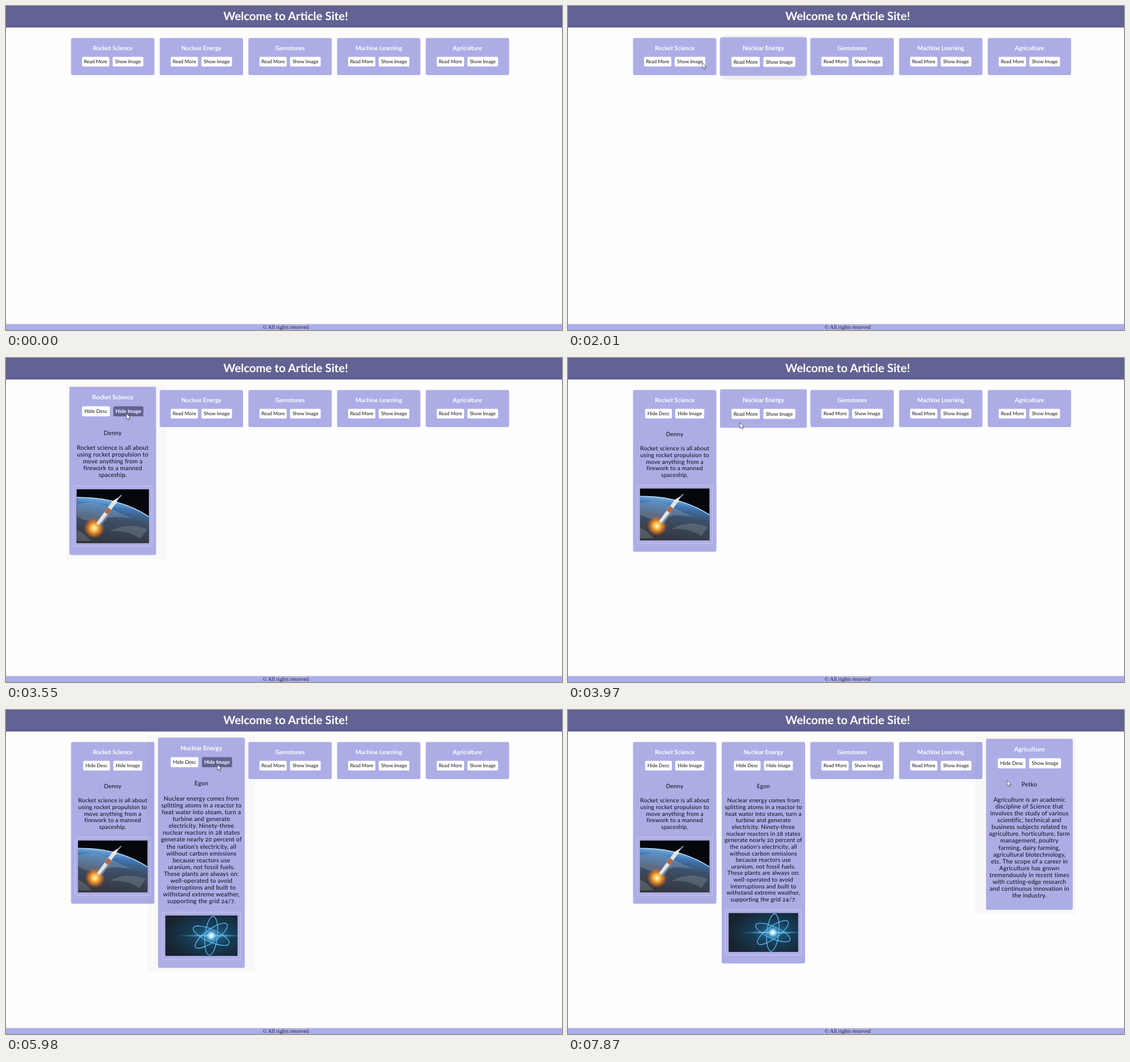
Recreate the animation shown at these times as an HTML page. Size 980x572 px, loop 8000 ms.

```html
<!DOCTYPE html>
<html lang="en">
<head>
<meta charset="utf-8">
<title>Article Site</title>
<style>
  html, body { margin: 0; width: 100%; height: 100%; overflow: hidden; background: #fefefe; }
  svg.stage { display: block; width: 980px; height: 572px; }
  text { text-anchor: middle; font-family: Lato, sans-serif; text-rendering: geometricPrecision; }
  .site { font-size: 20.4px; font-weight: 700; fill: #fff; }
  .foot { font: 9.7px "Liberation Serif", serif; fill: #20202c; }
  .head { font-size: 10.4px; font-weight: 700; fill: #fff; }
  .body { font-size: 10.3px; letter-spacing: .15px; fill: #0c0c16; font-variant-numeric: oldstyle-nums; }
  .btn { font-size: 8.6px; fill: #14141c; }
  .btn.on { font-weight: 700; fill: #fff; }
</style>
</head>
<body>
<svg class="stage" viewBox="0 0 980 572">
  <defs>
    <linearGradient id="earth" x1=".6" y1=".1" x2=".42" y2="1">
      <stop offset="0" stop-color="#6fa6dc"/><stop offset=".16" stop-color="#3f74b0"/>
      <stop offset=".42" stop-color="#3d4f68"/><stop offset="1" stop-color="#33363c"/>
    </linearGradient>
    <radialGradient id="flame">
      <stop offset="0" stop-color="#fffbd0"/><stop offset=".3" stop-color="#ffc04a"/>
      <stop offset=".65" stop-color="#e87a20" stop-opacity=".75"/><stop offset="1" stop-color="#c05010" stop-opacity="0"/>
    </radialGradient>
    <radialGradient id="space" cx=".63" cy=".5" r=".65">
      <stop offset="0" stop-color="#2470a0"/><stop offset=".45" stop-color="#163c56"/><stop offset="1" stop-color="#18232e"/>
    </radialGradient>
    <radialGradient id="core">
      <stop offset="0" stop-color="#fff"/><stop offset=".3" stop-color="#b8eaff"/><stop offset="1" stop-color="#3aa0e0" stop-opacity="0"/>
    </radialGradient>
  </defs>
  <rect width="980" height="572" fill="#fefefe"/>
  <rect width="980" height="38" fill="#626293"/>
  <text class="site" x="493" y="25">Welcome to Article Site!</text>
  <rect y="561.5" width="980" height="11" fill="#adade6"/>
  <text class="foot" x="493" y="570">© All rights reserved</text>
  <g id="cards"></g>
  <path id="cursor" d="M0 0V10.2L2.4 8 4.1 11.8 5.8 11 4.2 7.3H7.3Z" fill="#fff" stroke="#3a3a44" stroke-width=".8" stroke-linejoin="round"/>
</svg>
<script>
const LOOP = 8000, TOP = 56.5, WIDTH = 147, LINE = 11.64, GROW = 1.04;

const rocket = `<rect width="123" height="92" fill="#04060b"/>
  <path d="M0 14Q72 13 123 47V92H0Z" fill="url(#earth)"/>
  <path d="M0 14Q72 13 123 47" fill="none" stroke="#b4dcfa" stroke-width="1.5"/>
  <path d="M0 26Q30 18 56 32T96 50Q60 44 42 52T0 46Z" fill="#9fb4c8" opacity=".3"/>
  <path d="M56 72Q85 54 120 68L108 84Q84 68 56 72ZM0 70Q14 74 24 88H0Z" fill="#98a0a8" opacity=".3"/>
  <circle cx="30" cy="66" r="18" fill="url(#flame)"/>
  <path d="M36 60L64 22" stroke="#dfe3e8" stroke-width="7"/>
  <path d="M39 62L55 42" stroke="#7d8794" stroke-width="3"/>
  <path d="M50 41L56 33" stroke="#b8683c" stroke-width="7"/>
  <path d="M60 21L71 14 67 25Z" fill="#eef1f4"/>
  <path d="M68 19L76 10" stroke="#c8ced6" stroke-width="1.5"/>`;

const atom = `<rect width="123" height="69" fill="url(#space)"/>
  <ellipse cx="78" cy="34.5" rx="60" ry="2.5" fill="url(#core)" opacity=".6"/>
  ${[24, -36, -84].map(a => `<ellipse cx="78" cy="34.5" rx="33" ry="10.5" transform="rotate(${a} 78 34.5)"
    fill="none" stroke="#62bdf0" stroke-width="1.3"/>`).join("")}
  <circle cx="78" cy="34.5" r="12" fill="url(#core)"/>`;

const cards = [
  { title: "Rocket Science", author: "Denny", read: 2440, show: 3550, art: rocket, artH: 91.5,
    lines: "Rocket science is all about|using rocket propulsion to|move anything from a|firework to a manned|spaceship." },
  { title: "Nuclear Energy", author: "Egon", read: 4660, show: 5980, art: atom, artH: 69,
    lines: "Nuclear energy comes from|splitting atoms in a reactor to|heat water into steam, turn a|turbine and generate|electricity. Ninety-three|nuclear reactors in 28 states|generate nearly 20 percent of|the nation’s electricity, all|without carbon emissions|because reactors use|uranium, not fossil fuels.|These plants are always on:|well-operated to avoid|interruptions and built to|withstand extreme weather,|supporting the grid 24/7." },
  { title: "Gemstones" },
  { title: "Machine Learning" },
  { title: "Agriculture", author: "Petko", read: 7400,
    lines: "Agriculture is an academic|discipline of Science that|involves the study of various|scientific, technical and|business subjects related to|agriculture, horticulture, farm|management, poultry|farming, dairy farming,|agricultural biotechnology,|etc. The scope of a career in|Agriculture has grown|tremendously in recent times|with cutting-edge research|and continuous innovation in|the industry." }
];

// card, from, to
const hovers = [[3, 800, 1100], [2, 1250, 1640], [1, 1740, 2160], [0, 2170, 3800], [1, 3800, 6200], [4, 7010, 9000]];
// card, button, from, to
const presses = [[0, 1, 2170, 2300], [0, 0, 2350, 3100], [0, 1, 3140, 3700], [1, 0, 4380, 4800], [1, 1, 5500, 6100], [4, 0, 7080, 7550]];
// time, x, y
const path = [[580, 738, 0], [900, 690, 110], [1200, 600, 156], [1610, 406, 112], [1740, 400, 110], [2010, 237, 100],
  [2300, 170, 100], [2570, 161, 98], [3000, 161, 98], [3280, 212, 98], [3550, 212, 98], [3970, 303, 114],
  [4510, 312, 98], [4660, 312, 98], [5050, 351, 123], [5680, 372, 96], [5980, 372, 96], [6510, 607, 180],
  [7020, 778, 100], [7140, 778, 100], [7870, 774, 124]];

const labelWidth = { "Read More": 48, "Hide Desc": 47, "Show Image": 54, "Hide Image": 51 };
const ramp = (t, start) => {
  const p = Math.min(1, Math.max(0, (t - start) / 130));
  return p * p * (3 - 2 * p);
};
const text = (cls, x, y, s) => `<text class="${cls}" x="${x}" y="${y}">${s}</text>`;
const box = (x, y, w, h, r, rest) => `<rect x="${x}" y="${y}" width="${w}" height="${h}" rx="${r}" ${rest}/>`;

function shadow(cx, cy, height, open) {
  const half = WIDTH * GROW / 2, top = cy - height * GROW / 2, h = height * GROW;
  if (!open) return box(cx - half - 2, top - 4, half * 2 + 4, h + 11, 14, 'fill="#000" opacity=".055"');
  const left = Math.max(106, cx - half - 19), right = Math.min(895, cx + half + 18);
  return box(left, top - 4.5, right - left, h + 12, 0, 'fill="#000" opacity=".025"');
}

function buttons(i, cx, t, open, shown) {
  const labels = [open ? "Hide Desc" : "Read More", shown ? "Hide Image" : "Show Image"];
  let x = cx - (labelWidth[labels[0]] + labelWidth[labels[1]] + 6) / 2;
  return labels.map((label, b) => {
    const on = presses.some(p => p[0] === i && p[1] === b && t >= p[2] && t < p[3]);
    const w = labelWidth[label];
    const out = box(x, 89.7, w, 17, 2, `fill="${on ? "#626293" : "#fff"}"`) +
      text(on ? "btn on" : "btn", x + w / 2, 101.3, label);
    x += w + 6;
    return out;
  }).join("");
}

function picture(cx, y, card) {
  return box(cx - 66.5, y - 5.3, 133, card.artH + 10.6, 3, 'fill="none" stroke="#d6d6f4" stroke-width=".7"') +
    `<svg x="${cx - 61.3}" y="${y}" width="122.6" height="${card.artH}">${card.art}</svg>`;
}

function drawCard(card, i, t) {
  const cx = 188.1 + 156.3 * i, open = t >= card.read, shown = t >= card.show;
  const lines = open ? card.lines.split("|") : [];
  const textEnd = 172.3 + LINE * lines.length;
  const bottom = shown ? textEnd + card.artH + 20 : open ? textEnd : 122;
  const height = bottom - TOP, cy = TOP + height / 2;
  const mine = hovers.filter(h => h[0] === i);
  const lift = mine.reduce((sum, [, a, b]) => sum + ramp(t, a) * (1 - ramp(t, b)), 0);
  const shaded = mine.some(([, a, b]) => t >= a + 220 && t < b + 50);

  let out = box(cx - WIDTH / 2, TOP, WIDTH, height, 3, 'fill="#adade6"') +
    text("head", cx, 78.2, card.title) + buttons(i, cx, t, open, shown);
  if (open) {
    out += text("body", cx, 138, card.author) +
      lines.map((line, n) => text("body", cx, 163.4 + LINE * n, line)).join("");
  }
  if (shown) out += picture(cx, textEnd - .2, card);
  const scale = 1 + (GROW - 1) * lift;
  return (shaded ? shadow(cx, cy, height, open) : "") +
    `<g transform="translate(${cx} ${cy}) scale(${scale}) translate(${-cx} ${-cy})">${out}</g>`;
}

function pointer(t) {
  const k = path.findIndex(p => p[0] > t);
  if (k < 0) return path[path.length - 1].slice(1);
  const [t0, x0, y0] = path[k - 1], [t1, x1, y1] = path[k], p = (t - t0) / (t1 - t0);
  return [x0 + (x1 - x0) * p, y0 + (y1 - y0) * p];
}

const layer = document.getElementById("cards"), cursor = document.getElementById("cursor");

function draw(t) {
  layer.innerHTML = cards.map((card, i) => drawCard(card, i, t)).join("");
  const visible = t >= path[0][0];
  cursor.setAttribute("visibility", visible ? "visible" : "hidden");
  if (visible) cursor.setAttribute("transform", `translate(${pointer(t)})`);
}

function tick() {
  draw(performance.now() % LOOP);
  requestAnimationFrame(tick);
}
tick();
</script>
</body>
</html>
```
